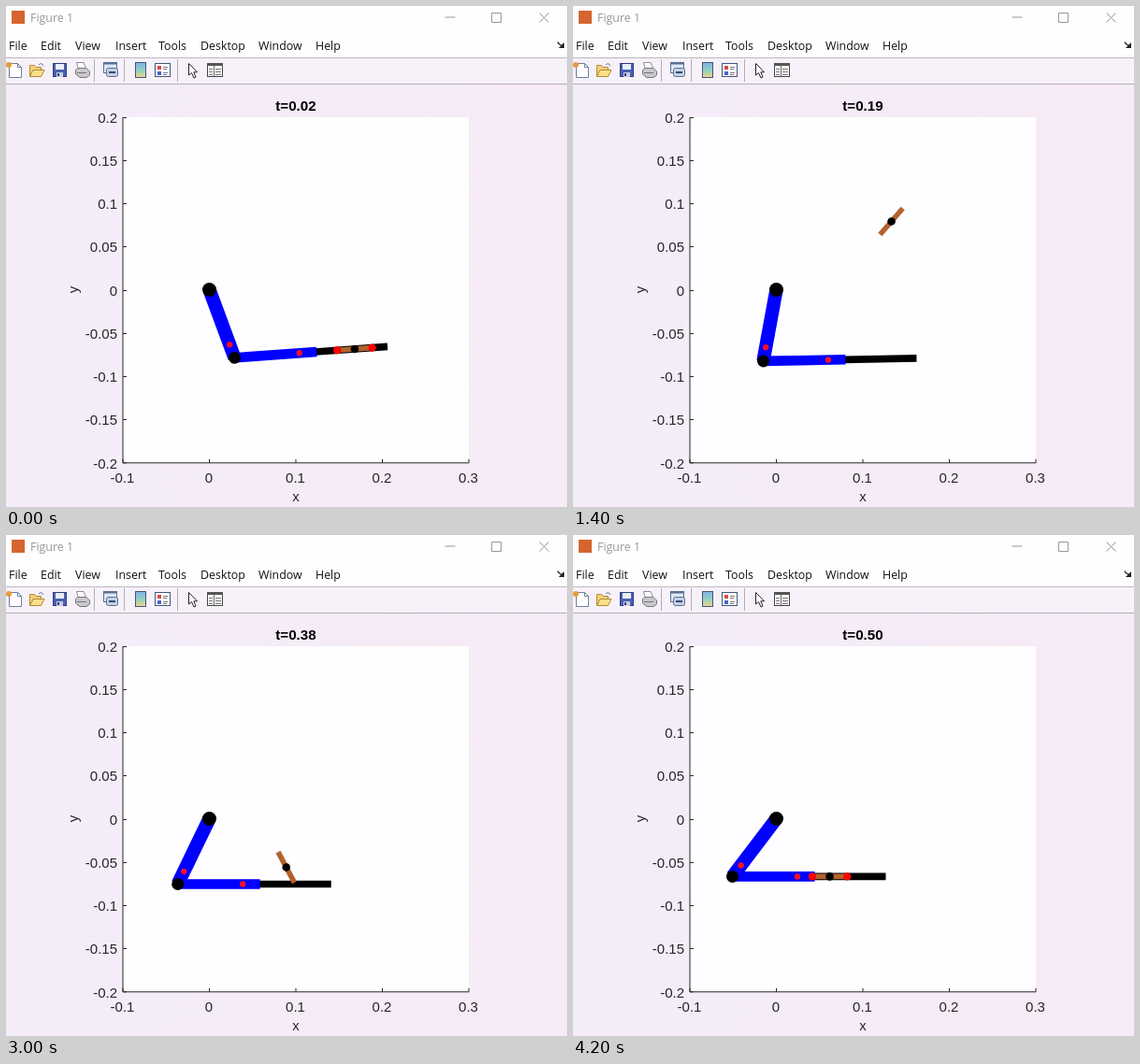
Write an HTML page that moves like this. It is 600 by 536 pixels and loops after 4300 ms.

```html
<!DOCTYPE html>
<html lang="en">
<head>
<meta charset="utf-8">
<title>Figure 1</title>
<style>
  html, body { margin: 0; width: 100%; height: 100%; overflow: hidden; background: #f5ecf8; }
  svg { display: block; width: 600px; height: 536px; }
  .ui { font: 12.4px "Open Sans", sans-serif; fill: #111; }
  .axis { font: 15px "Liberation Sans", Arial, sans-serif; fill: #262626; }
  .title { font-weight: bold; font-size: 15.2px; fill: #000; }
  .mid { text-anchor: middle; }
  .end { text-anchor: end; }
</style>
</head>
<body>
<svg viewBox="0 0 600 536" xmlns="http://www.w3.org/2000/svg">
  <defs>
    <linearGradient id="bg"><stop offset="0" stop-color="#f4edf9"/><stop offset="1" stop-color="#f6ebf6"/></linearGradient>
    <linearGradient id="bar" x2="0" y2="1"><stop offset="0" stop-color="#7fb4e6"/><stop offset=".5" stop-color="#8fd0c4"/><stop offset="1" stop-color="#f0d486"/></linearGradient>
  </defs>
  <rect width="600" height="536" fill="url(#bg)"/>
  <rect width="600" height="55" fill="#fefdff"/>
  <rect y="55" width="600" height="28" fill="#f7f1f9"/>
  <path d="M0 55.5H600" stroke="#bdb8bf"/>
  <path d="M0 83.5H600" stroke="#b3adb5"/>

  <!-- title bar -->
  <rect x="6" y="5" width="14" height="14" fill="#d5652f"/>
  <text class="ui" x="26" y="17" style="fill:#999">Figure 1</text>
  <path d="M469.5 12H480.5M519.5 7.5H529.5V17.5H519.5ZM570.5 7.5L580.5 17.5M580.5 7.5L570.5 17.5" fill="none" stroke="#999"/>

  <g id="menu" class="ui"></g>
  <path d="M590 38.5Q592 42 595 42.5" fill="none" stroke="#222" stroke-width="1.4"/>
  <path d="M597 39V45H591Z" fill="#222"/>

  <!-- toolbar -->
  <path d="M94.5 57V81M126.5 57V81M183.5 57V81" stroke="#b3aeb5"/>
  <g stroke-width="1">
    <path d="M3.5 61.5H12.5L16.5 65.5V76.5H3.5Z" fill="#fff" stroke="#6d7f9d"/>
    <path d="M12.5 61.5V65.5H16.5" fill="none" stroke="#6d7f9d"/>
    <circle cx="3" cy="63" r="3" fill="#e89a3c"/>
    <path d="M25.5 75.5V63.5H30.5L32 65.5H37.5V68" fill="#f2d27a" stroke="#b08a35"/>
    <path d="M25.5 75.5L29 68.5H41L37.5 75.5Z" fill="#fbe08a" stroke="#b08a35"/>
    <path d="M35 63Q38 60 40 64" fill="none" stroke="#5b6fa0"/>
    <rect x="50.5" y="61.5" width="14" height="14" fill="#4a5fb0" stroke="#2f3c80"/>
    <path d="M53 62H62V68H53Z" fill="#e8effa"/>
    <path d="M54 71H61V76H54Z" fill="#c9cfe0"/>
    <path d="M55 72H57V75H55Z" fill="#2f3c80"/>
    <path d="M77.5 67.5L75.5 60.5H83L86 67.5Z" fill="#fff" stroke="#8a8f9c"/>
    <path d="M74.5 68.5L77 66.5H86L89.5 70V74L86 76.5H79L74.5 73Z" fill="#c9c8cf" stroke="#777"/>
    <path d="M76 71.5H86" stroke="#777"/>
    <rect x="104.5" y="60.5" width="14" height="11" fill="#dce8f6" stroke="#5a6f96"/>
    <path d="M104 61.5H119" stroke="#5a6f96" stroke-width="2"/>
    <rect x="107.5" y="66.5" width="12" height="9" rx="2" fill="#c5d0e2" stroke="#5a6f96"/>
    <path d="M110 71H117" stroke="#3b4a70" stroke-width="2"/>
    <rect x="138.5" y="60.5" width="11" height="16" fill="url(#bar)" stroke="#43557c"/>
    <rect x="159.5" y="61.5" width="16" height="14" fill="#fff" stroke="#43557c"/>
    <path d="M162 64H166V68H162Z" fill="#d94a3e"/>
    <path d="M162 70H166V74H162Z" fill="#4a62c8"/>
    <path d="M168 65.5H173M168 67.5H172M168 71.5H173M168 73.5H172" stroke="#777"/>
    <path d="M195.5 61.5V74L198.5 71.5L201 77L203 76L200.8 70.8H204.5Z" fill="#fff" stroke="#222"/>
    <rect x="215.5" y="61.5" width="16" height="14" fill="#fff" stroke="#444"/>
    <path d="M215 62.5H232" stroke="#555" stroke-width="3"/>
    <path d="M222.5 64V75" stroke="#666"/>
    <path d="M224 67.5H230M224 70.5H230M224 73.5H230M217 67.5H221M217 70.5H221M217 73.5H221" stroke="#777"/>
  </g>

  <!-- axes -->
  <rect x="125" y="119" width="370" height="370" fill="#fefdff"/>
  <path id="ticks" fill="none" stroke="#262626"/>
  <g id="labels" class="axis"></g>
  <text class="axis mid" x="310" y="530">x</text>
  <text class="axis mid" transform="translate(77 303.5) rotate(-90)">y</text>
  <text id="clock" class="axis title mid" x="310" y="112"></text>

  <!-- mechanism -->
  <g id="upper">
    <path d="M0 0V77.7" stroke="#00f" stroke-width="14.4"/>
    <circle cy="62.7" r="3.2" fill="#f5102a"/>
  </g>
  <circle cx="217.5" cy="303.5" r="7.5"/>
  <g id="fore">
    <path d="M87 0H164" stroke="#000" stroke-width="7.6"/>
    <path d="M0 0H88" stroke="#00f" stroke-width="10.6"/>
    <circle cx="69.5" r="3.2" fill="#f5102a"/>
    <circle r="6.5"/>
  </g>
  <g id="stick">
    <path d="M-18.5 0H18.5" stroke="#b4622d" stroke-width="5.6"/>
    <g id="contacts" fill="#f00"><circle cx="-18.7" r="4.2"/><circle cx="18.7" r="4.2"/></g>
    <circle r="4.3"/>
  </g>
</svg>
<script>
const $ = id => document.getElementById(id);
const STEP = 100, COUNT = 43;
const BASE = { x: 217.5, y: 303.5 }, UPPER = 77.7;
const RELEASE = 3, LANDING = 30;

// Each table holds [step, value] pairs; angles are in degrees.
const CLOCK = [[0, .02], [9, .13], [14, .19], [21, .27], [26, .33], [34, .42], [42, .5]];
const SHOULDER = [[0, 20.3], [1, 17], [3, 10], [6, 2], [9, -4.4], [12, -8.6], [14, -10.4],
  [21, -17.2], [26, -21.8], [34, -29.7], [42, -37.2]];
const FORE = [[0, 4.2], [1, 7.3], [2, 13], [3, 18.5], [4, 23], [5, 26], [6, 27], [7, 26], [8, 23.5],
  [9, 19.6], [10, 14.5], [11, 9], [12, 5], [14, 1.05], [21, -.2], [26, 0], [42, 0]];
const SPIN = [[3, 12], [6, 16.5], [9, 28.4], [14, 49], [21, 80.5], [26, 100.7], [30, 118], [31, 150], [32, 180]];
const SLIDE = [[0, 128.8], [3, 144], [30, 116], [34, 112], [42, 104]];
const LIFT = [[30, 18], [31, 8], [32, 0]];

function at(table, n) {
  const i = table.findIndex(k => k[0] >= n);
  if (i < 0) return table[table.length - 1][1];
  if (i === 0) return table[0][1];
  const [a, u] = table[i - 1], [b, v] = table[i];
  return u + (v - u) * (n - a) / (b - a);
}

const rad = deg => deg * Math.PI / 180;

function place(id, p, deg) {
  $(id).setAttribute('transform', `translate(${p.x.toFixed(2)} ${p.y.toFixed(2)}) rotate(${deg.toFixed(2)})`);
}

// Ballistic flight
const flight = n => ({
  x: 353 - 2.49 * (n - 9),
  y: 257 - 5.3 * (n - 9) + (n - 9) * (n - 14) * (.638 - .0025 * (n - 21))
});

function draw(n) {
  const shoulder = at(SHOULDER, n), fore = at(FORE, n);
  const elbow = {
    x: BASE.x + UPPER * Math.sin(rad(shoulder)),
    y: BASE.y + UPPER * Math.cos(rad(shoulder))
  };
  place('upper', BASE, -shoulder);
  place('fore', elbow, -fore);

  const flying = n >= RELEASE && n < LANDING;
  const d = at(SLIDE, n), lift = n < RELEASE ? 0 : at(LIFT, n);
  const ball = flying ? flight(n) : {
    x: elbow.x + d * Math.cos(rad(fore)),
    y: elbow.y - d * Math.sin(rad(fore)) - lift
  };
  place('stick', ball, n < RELEASE ? -fore : -at(SPIN, n));
  $('contacts').style.display = flying || lift ? 'none' : '';
  $('clock').textContent = 't=' + at(CLOCK, n).toFixed(2);
}

function label(parent, text, x, y, cls) {
  const el = document.createElementNS('http://www.w3.org/2000/svg', 'text');
  el.setAttribute('x', x);
  el.setAttribute('y', y);
  if (cls) el.setAttribute('class', cls);
  el.textContent = text;
  $(parent).append(el);
}

function build() {
  const menu = { File: 3, Edit: 37, View: 74, Insert: 117, Tools: 163, Desktop: 208, Window: 270, Help: 331 };
  for (const name in menu) label('menu', name, menu[name], 47);

  let d = 'M125 119V488.8H495';
  for (let i = 0; i < 9; i++) {
    const y = 119 + i * 46.25;
    d += `M125 ${Math.min(488.8, Math.floor(y) + .5)}h4`;
    label('labels', String((20 - 5 * i) / 100), 119, y + 5.5, 'end');
  }
  for (let i = 0; i < 5; i++) {
    const x = 125 + i * 92.5;
    d += `M${x} 488.8v-4`;
    label('labels', String((i - 1) / 10), x - .5, 510, 'mid');
  }
  $('ticks').setAttribute('d', d);
}

build();
draw(0);
const start = performance.now();
function tick() {
  draw(Math.floor((performance.now() - start) / STEP) % COUNT);
  requestAnimationFrame(tick);
}
requestAnimationFrame(tick);
</script>
</body>
</html>
```
